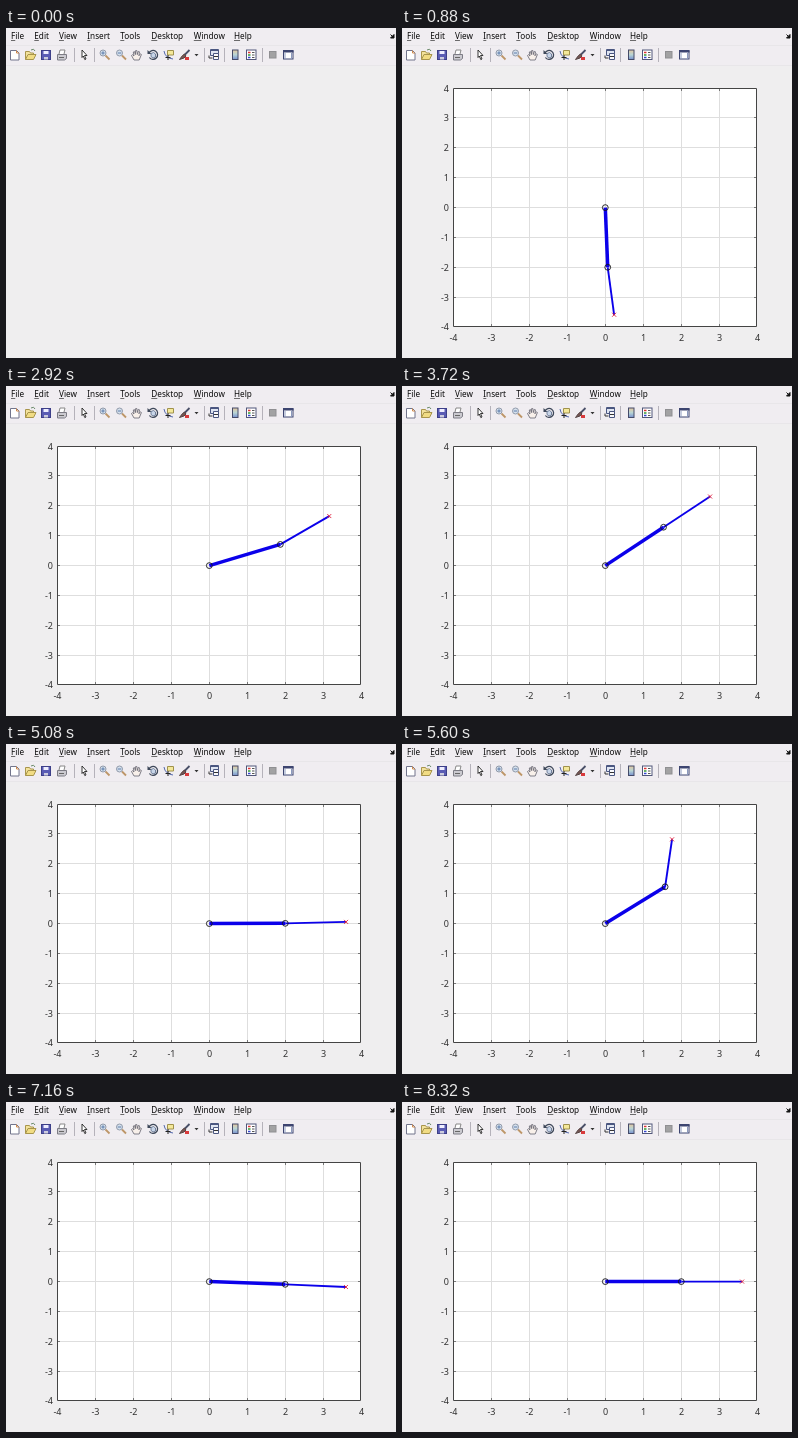
These frames come from a looping animation (390 px wide and 330 px high, 8.36 s). An HTML page:

```html
<!DOCTYPE html>
<html lang="en">
<head>
<meta charset="utf-8">
<title>Two-link arm</title>
<style>
  html, body { margin: 0; width: 100%; height: 100%; overflow: hidden; background: #efeeef; }
  svg { display: block; width: 390px; height: 330px; }
  text { font-family: "Noto Sans", "Open Sans", sans-serif; }
  #menu text { font-size: 8.2px; fill: #080808; }
  #labels text { font-size: 9px; fill: #303030; }
  .grid { stroke: #dedede; }
  .axis { stroke: #444; fill: none; }
  .tick { stroke: #777; }
  .arm { stroke: #0b00ea; }
  .joint { fill: none; stroke: #151515; stroke-width: .9; }
</style>
</head>
<body>
<svg viewBox="0 0 390 330">
  <rect width="390" height="330" fill="#efeeef"/>
  <rect width="390" height="37" fill="#f0edf1"/>
  <path d="M0 17.5H390M0 37.5H390" stroke="#e8e6e9"/>
  <g id="menu"></g>
  <path d="M384.500 6.500l2 2M388 6.500v3.500h-3.500z" fill="#111" stroke="#111"/>

  <g id="toolbar" fill="none" stroke-width="1">
    <path d="M68.5 20v14M88.5 20v14M198.5 20v14M218.5 20v14M256.5 20v14" stroke="#b5b2ba"/>
    <!-- new, open, save, print -->
    <path d="M4.5 22.5h6l2.500 2.500v7h-8.500z" fill="#fff" stroke="#72758c"/>
    <path d="M10.500 22.500v2.500h2.500" stroke="#d08a4c"/>
    <path d="M19.500 31.500v-8h4l1 1.500h3v2" fill="#f3e29c" stroke="#a8954c"/>
    <path d="M19.500 31.500l2.500-5h8l-2.500 5z" fill="#f1dc84" stroke="#a8954c"/>
    <path d="M25 22q3-2 4 1" stroke="#6a8a6a"/>
    <rect x="35.500" y="22.500" width="9" height="9" fill="#5a5cb4" stroke="#3d3f88"/>
    <path d="M37.500 23h5v3h-5z" fill="#eef" stroke="none"/>
    <path d="M38 29h4v2.500h-4z" fill="#ccd" stroke="none"/>
    <path d="M53 26l1-4h5l-1 4" fill="#fff" stroke="#888"/>
    <path d="M51.500 26.500h9v4l-2 1.500h-7z" fill="#cbcad0" stroke="#7d7c85"/>
    <path d="M53 29.500h5" stroke="#666"/>
    <!-- pointer -->
    <path d="M76 22l5 5.500h-2.500l1.500 3.500-1.200.6-1.500-3.600-1.300 1.500z" fill="#fff" stroke="#222" stroke-width=".9"/>
    <!-- zoom in, zoom out -->
    <g id="zoom">
      <path d="M99.500 27.500l4 4" stroke="#bd9668" stroke-width="1.800"/>
      <circle cx="97" cy="25" r="3" fill="#d5e0ec" stroke="#929bab"/>
      <path d="M95.300 25h3.400" stroke="#5c7cab"/>
    </g>
    <use href="#zoom" x="16.500"/>
    <path d="M97 23.300v3.400" stroke="#5c7cab"/>
    <!-- pan -->
    <path d="M128 32l-2.500-4.500 1-.8 1.500 1.300-.7-4 1.200-.4.9 3 .2-4h1.300l.4 4 1-3.200 1.200.4-.6 4 1.500-2 1 .7-2.200 5.500z" fill="#f8f0ea" stroke="#63636f" stroke-width=".8"/>
    <!-- rotate -->
    <path d="M143 25a4.500 4.500 0 1 1 .4 4.500" stroke="#3d4759" stroke-width="1.300"/>
    <path d="M141.500 22v4h4z" fill="#3d4759"/>
    <path d="M145 25.500l2.500-1 2 1.500v3l-2.500 1-2-1.500z" fill="#c8d5e8" stroke="#596a88" stroke-width=".8"/>
    <!-- data cursor -->
    <path d="M161.500 22.500h6v4.500h-6z" fill="#f4e89a" stroke="#a0924c"/>
    <path d="M158 23q1 7 9 8" stroke="#5468ac"/>
    <path d="M162 27v5M159.500 29.500h5" stroke="#222"/>
    <!-- brush -->
    <path d="M183.500 22l-5 5" stroke="#4a5068" stroke-width="1.800"/>
    <path d="M178.500 26l-2 1.500-3 4 4.500-1.500 2-2z" fill="#765653" stroke="#544"/>
    <path d="M179 29h4v3h-4z" fill="#d83a3c"/>
    <path d="M188.500 26h4l-2 2.300z" fill="#333"/>
    <!-- link -->
    <path d="M204.500 21.500h8v6h-8z" fill="#dfe5f2" stroke="#4a5680"/>
    <path d="M204.500 22.500h8" stroke="#4a5680"/>
    <path d="M207.500 25.500h5v6h-5z" fill="#f8f8fc" stroke="#4a5680"/>
    <path d="M203 27.500v2.500h3.500M208 28.500h4" stroke="#333"/>
    <!-- colorbar, legend -->
    <rect x="226.500" y="22" width="5.500" height="9.500" fill="url(#bar)" stroke="#444a68"/>
    <rect x="240.500" y="22" width="9.500" height="9.500" fill="#fff" stroke="#51567a"/>
    <path d="M242 24.500h2.500" stroke="#d33" stroke-width="1.500"/>
    <path d="M242 27h2.500" stroke="#393" stroke-width="1.500"/>
    <path d="M242 29.500h2.500" stroke="#34c" stroke-width="1.500"/>
    <path d="M246 24.500h2.500M246 27h2.500M246 29.500h2.500" stroke="#555"/>
    <!-- hide tools, dock -->
    <rect x="263.500" y="23.500" width="6.500" height="6.500" fill="#a2a2a3" stroke="#8f8f92"/>
    <rect x="277.500" y="22.500" width="9.500" height="8.500" fill="#fff" stroke="#3d4570"/>
    <path d="M277 23.500h10.500" stroke="#3d4570" stroke-width="2"/>
    <path d="M279 25v6M285.500 25v6" stroke="#8b99bd"/>
  </g>
  <defs>
    <linearGradient id="bar" x2="0" y2="1">
      <stop stop-color="#e3c7a1"/><stop offset=".5" stop-color="#b8d5d5"/><stop offset="1" stop-color="#7790ce"/>
    </linearGradient>
  </defs>

  <g id="plot" visibility="hidden">
    <rect x="51.500" y="60.500" width="303" height="238" fill="#fff"/>
    <g id="grid"></g>
    <g id="labels"></g>
    <path id="upper" class="arm" stroke-width="3.500"/>
    <path id="lower" class="arm" stroke-width="1.900"/>
    <circle id="base" class="joint" r="2.900"/>
    <circle id="elbow" class="joint" r="2.900"/>
    <path id="tip" d="M-2-2L2 2M-2 2L2-2" stroke="#e0203c" stroke-width=".9"/>
  </g>
</svg>
<script>
const LOOP = 8360, STEP = 40, PLOT_AT = 520;
const ORIGIN = { x: 203.3, y: 179.6 }, UNIT = { x: 38, y: 29.85 };
const byId = id => document.getElementById(id);

function add(parent, tag, attrs, text = "") {
  const node = document.createElementNS("http://www.w3.org/2000/svg", tag);
  for (const key in attrs) node.setAttribute(key, attrs[key]);
  node.textContent = text;
  byId(parent).append(node);
  return node;
}

const menu = { File: 5, Edit: 28.3, View: 53, Insert: 81.3, Tools: 114.3, Desktop: 145.3, Window: 187.8, Help: 228 };
for (const [name, x] of Object.entries(menu)) {
  const label = add("menu", "text", { x, y: 11.2 }, name);
  const width = Math.max(3, label.getSubStringLength(0, 1));
  add("menu", "path", { d: `M${x} 12.500h${width}`, stroke: "#333", "stroke-width": .7 });
}

let ticks = "";
for (let n = -4; n <= 4; n++) {
  const x = 203.5 + n * UNIT.x, y = Math.floor(179.46 - n * UNIT.y) + .5;
  if (Math.abs(n) < 4) {
    add("grid", "path", { class: "grid", d: `M${x} 61V298M52 ${y}H354` });
    ticks += `M${x} 298v-2M${x} 61v2M52 ${y}h2M354 ${y}h-2`;
  }
  add("labels", "text", { x, y: 313.3, "text-anchor": "middle" }, n);
  add("labels", "text", { x: 47, y: y + 3.3, "text-anchor": "end" }, n);
}
add("grid", "path", { class: "tick", d: ticks });
add("grid", "path", { class: "axis", d: "M51.500 60.500H354.500V298.500H51.500Z" });

// Joint targets in degrees, each with its natural frequency and damping.
const moves = [
  { start: 835, settled: 2360, to: [0, 45], freq: [4.65, 11], damp: [.5, .8] },
  { start: 2645, settled: 3720, to: [40, 0], freq: [5.5, 7], damp: [.75, .8] },
  { start: 4250, settled: 4880, to: [0, 0], freq: [9.5, 9], damp: [.65, .8] },
  { start: 5057, settled: 6280, to: [40, 45], freq: [5, 12], damp: [.65, .8] },
  { start: 6515, settled: 7520, to: [0, 0], freq: [6, 9], damp: [.65, .8] }
];

// Remaining share of a step for an underdamped second-order joint.
function residual(seconds, freq, damp) {
  const root = Math.sqrt(1 - damp * damp), phase = freq * root * seconds;
  return Math.exp(-damp * freq * seconds) * (Math.cos(phase) + damp / root * Math.sin(phase));
}

function pose(t) {
  let angles = [-90, 0];
  for (const { start, settled, to, freq, damp } of moves) {
    if (t < start) break;
    const u = Math.min(1, Math.max(0, (t - settled + 300) / 300));
    const fade = 1 - u * u * (3 - 2 * u);
    angles = angles.map((from, i) =>
      to[i] + (from - to[i]) * fade * residual((t - start) / 1000, freq[i], damp[i]));
  }
  return angles;
}

function reach(from, length, degrees) {
  const a = degrees * Math.PI / 180;
  return { x: from.x + length * UNIT.x * Math.cos(a), y: from.y - length * UNIT.y * Math.sin(a) };
}

const segment = (a, b) => `M${a.x} ${a.y}L${b.x} ${b.y}`;
const place = (id, p) => byId(id).setAttribute("transform", `translate(${p.x} ${p.y})`);

function draw() {
  const t = Math.floor(performance.now() % LOOP / STEP) * STEP;
  const [q1, q2] = pose(t);
  const elbow = reach(ORIGIN, 2, q1), tip = reach(elbow, 1.6, q1 + q2);
  byId("plot").setAttribute("visibility", t < PLOT_AT ? "hidden" : "visible");
  byId("upper").setAttribute("d", segment(ORIGIN, elbow));
  byId("lower").setAttribute("d", segment(elbow, tip));
  place("elbow", elbow);
  place("tip", tip);
  requestAnimationFrame(draw);
}
place("base", ORIGIN);
draw();
</script>
</body>
</html>
```
